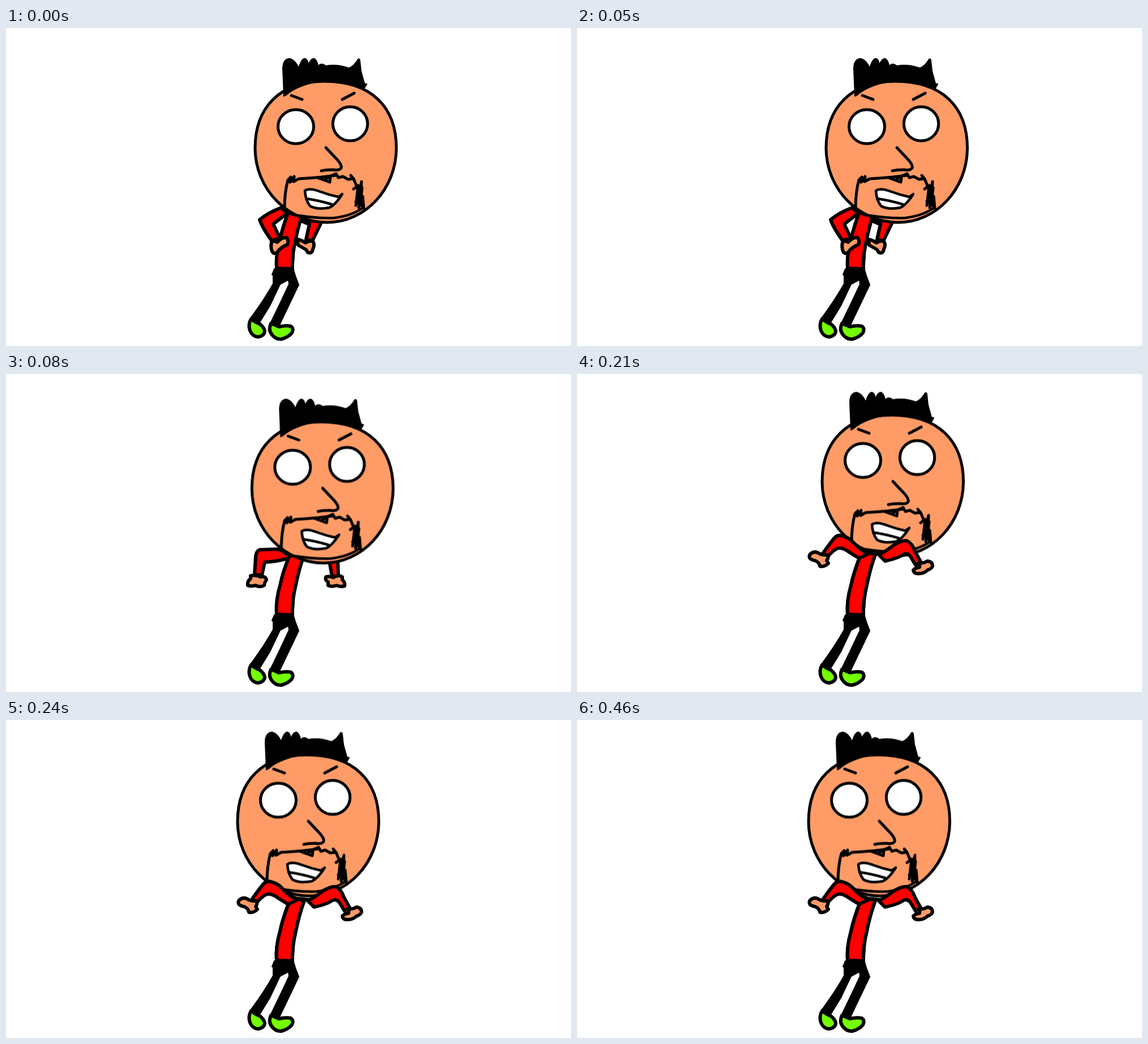
An HTML page for the animation above (0.6 s loop, 998 by 561 pixels).

```html
<!DOCTYPE html>
<html lang="en">
<head>
<meta charset="utf-8">
<title>Jumping man</title>
<style>
html, body { margin: 0; width: 100%; height: 100%; overflow: hidden; background: #fff; }
svg { display: block; width: 100%; height: 100%; }
path, ellipse { stroke: #000; stroke-width: 5; stroke-linecap: round; stroke-linejoin: round; }
.skin { fill: #ff9b66; }
.shirt { fill: #f00; }
.shoe { fill: #73ff00; }
.white { fill: #fff; }
.line { fill: none; }
.limb path { stroke-width: 6; }
.head { animation: rise .6s step-end infinite; }
.pose { visibility: hidden; animation: .6s step-end infinite; }
.low { animation-name: low; }
.mid { animation-name: mid; }
.high { animation-name: high; }
@keyframes rise {
  0% { transform: none; }
  13.3333% { transform: translate(-5.7px, -9.5px); }
  26.6667% { transform: translate(-7px, -21.5px); }
  40%, 100% { transform: translate(-31px, -32.5px); }
}
@keyframes low { 0% { visibility: visible; } 13.3333%, 100% { visibility: hidden; } }
@keyframes mid { 0% { visibility: hidden; } 13.3333% { visibility: visible; } 26.6667%, 100% { visibility: hidden; } }
@keyframes high { 0% { visibility: hidden; } 26.6667%, 100% { visibility: visible; } }
</style>
</head>
<body>
<svg viewBox="0 0 998 561">
  <!-- arms behind the head -->
  <g class="limb pose low">
    <path class="shirt" d="M486 317 Q464 325 448 338 Q452 351 469 375 L484 371 L472 346 Q482 338 497 327Z"/>
    <path class="shirt" d="M524 339 L536 346 L530 373 L541 376 L556 345 L550 330Z"/>
    <path class="line" d="M519 338 L535 345" style="stroke-width:8"/>
  </g>
  <g class="limb pose mid">
    <path class="shirt" d="M499 320 Q488 310 478 309 L448 310 Q442 312 441 322 L439 354 L452 355 L457 332 Q478 331 499 325Z"/>
    <path class="shirt" d="M570 325 L576 357 L587 357 L586 325Z"/>
  </g>

  <g class="limb">
    <path id="torso" class="shirt" d="M500 322 Q489 349 484 373 Q476 400 478 424 L506 425 Q505 400 512 372 Q517 346 527 318 L517 316Z"/>
    <path class="line" d="M507 403 L506 415"/>
    <path class="shoe" d="M433 513 Q427 523 431 534 Q435 544 445 545 Q457 543 457 534 Q455 527 448 522 Q441 520 433 513Z"/>
    <path class="shoe" d="M468 521 Q463 532 469 540 Q475 549 486 549 Q498 546 505 538 Q509 530 503 526 Q494 524 482 527Z"/>
    <path style="stroke-width:2" d="M474 425 L508 427 L511 437 L517 453 Q498 493 482 526 L467 521 L484 486 L500 452 L499 444 L484 452 L466 490 L447 521 L432 512 Q457 478 472 451 L472 436 L470 435Z"/>
  </g>

  <g class="limb pose low">
    <path class="skin" d="M469 378 Q473 374 479 378 Q488 368 496 370 Q500 377 497 382 L489 386 Q482 391 479 396 Q473 400 470 394 Q467 386 469 378Z"/>
    <path class="skin" d="M515 373 Q522 374 529 379 Q534 375 542 376 Q546 382 542 390 Q541 399 533 396 L530 391 L516 383Z"/>
  </g>
  <g class="limb pose mid">
    <path class="skin" d="M432 356 Q442 354 449 358 Q459 356 460 363 Q457 367 456 373 Q449 377 441 373 Q432 375 427 373 Q426 365 432 361Z"/>
    <path class="skin" d="M565 358 Q572 356 578 359 Q587 353 594 358 L594 363 Q600 368 598 374 Q591 376 584 373 Q575 376 569 373 L569 367 Q563 364 565 358Z"/>
  </g>

  <g class="head">
    <path class="skin" d="M562 94 C646 94 689.5 140 689.5 212 C689 285 634 343 567 343 C498 343 440 284 440 212 C440 140 484 94 562 94Z"/>
    <path style="stroke-width:2" d="M491 120 L489 72 Q489 55 501 54 Q511 56 517 71 Q522 54 528 54 Q533 55 534 66 Q538 54 544 54 Q550 57 551 68 Q557 60 565 67 Q584 63 606 71 Q616 66 622 55 Q625 54 625 58 L627 76 L633 98 L637 99 L633 106 Q602 98 577 95 Q549 93 526 101 Q506 108 495 118Z"/>
    <ellipse class="white" cx="512" cy="174" rx="31.5" ry="30"/>
    <ellipse class="white" cx="608" cy="169" rx="30.7" ry="30"/>
    <path class="line" d="M504 119 L523 126 M594 126 L615 115"/>
    <path class="line" d="M565 211 L581 228 Q594 241 592 247 Q588 252 578 250 Q565 250 557 252"/>
    <path class="line" d="M492 318 Q492 290 498 268 L503 263 L502 272 L509 262 L508 271 L517 266 Q536 265 557 263 L582 260"/>
    <path class="line" d="M550 264 L572 272 L573 263 L565 266 M574 261 L583 257 L587 264 L595 262 L604 267 L612 266 L609 260 L614 266 L621 283"/>
    <path class="line" d="M614 284 L622 278 L618 313 L624 289 L628 271 L627 291 L623 317 L630 297 L632 319 L626 309 L629 282 L618 306"/>
    <path class="line" style="stroke-width:4.5" d="M492 318 Q500 331 519 331 Q549 336 580 335 Q611 331 629 318"/>
    <path class="white" style="stroke-width:4.5" d="M528 287 Q536 281 556 289 Q572 295 587 298 L594 293 Q582 312 571 317 Q549 321 537 314 Q529 304 528 287Z"/>
    <path class="line" style="stroke-width:4.5" d="M530 301 Q552 304 575 311"/>
  </g>

  <!-- raised arms in front of the head -->
  <g class="limb pose high">
    <use href="#torso"/>
    <path class="line" d="M490 306 L514 315 L534 317"/>
    <path class="shirt" d="M434 317 Q445 301 454 290 Q461 282 470 286 Q481 289 489 298 Q500 311 515 317 L498 325 L482 315 Q471 307 464 307 Q456 307 443 322Z"/>
    <path class="shirt" d="M533 319 Q547 312 559 302 Q573 293 582 294 Q592 298 597 313 L607 331 L598 337 L589 322 Q584 315 577 318 Q568 325 544 330Z"/>
    <path class="skin" d="M411 319 Q417 312 425 315 Q432 320 441 319 Q446 323 441 329 L444 334 Q437 341 429 339 Q428 332 420 329 Q408 327 411 319Z"/>
    <path class="skin" d="M606 333 Q613 334 619 330 Q628 331 628 339 Q626 344 619 346 Q613 352 605 352 Q595 353 594 346 Q597 342 605 341Z"/>
  </g>
</svg>
</body>
</html>
```
